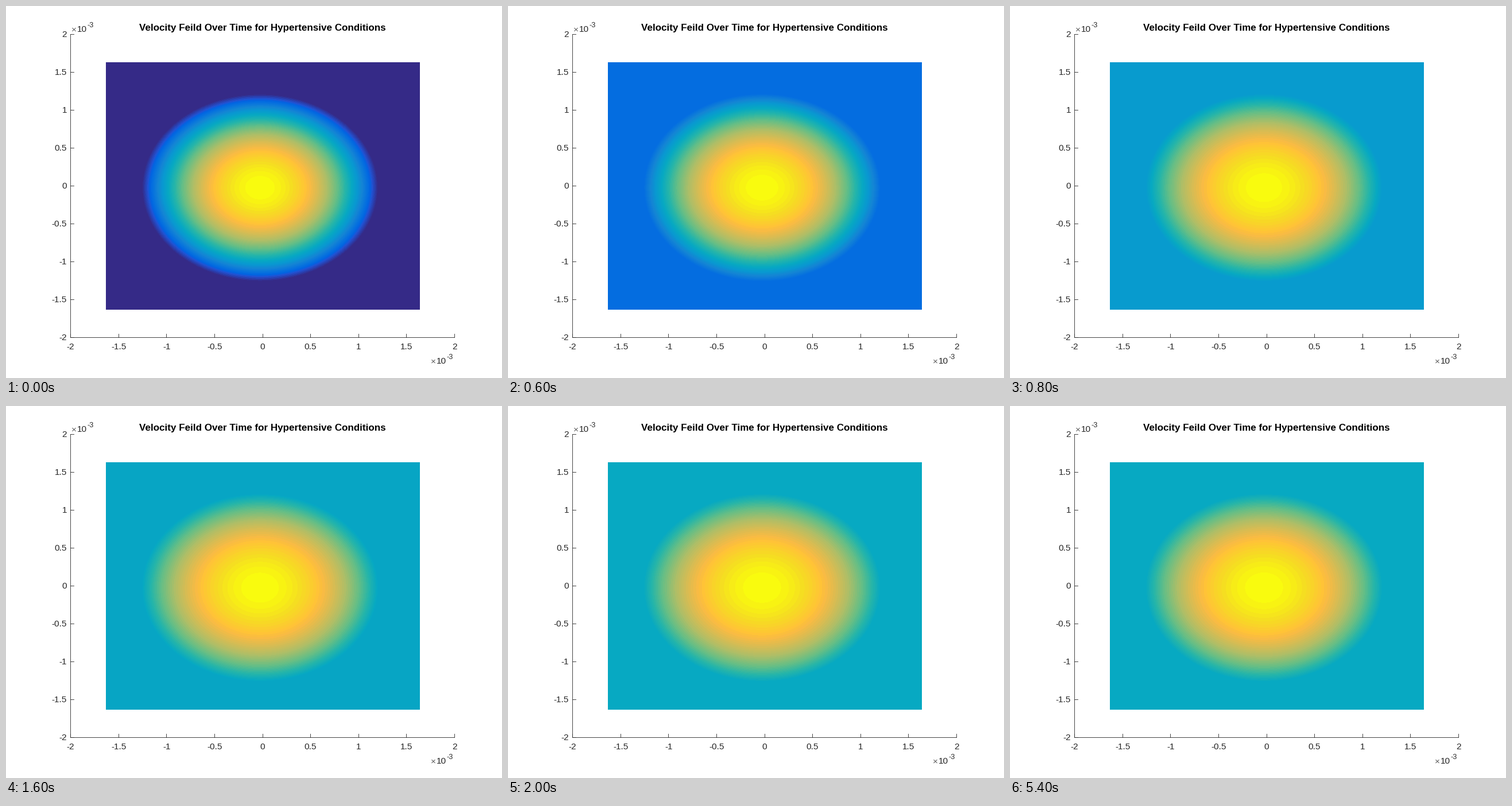
A matplotlib script for the animation above (5.6 s loop, 864x648 px).

```python
import numpy as np
import matplotlib.pyplot as plt
from matplotlib.animation import FuncAnimation
from matplotlib.colors import LinearSegmentedColormap

W, H, DPI = 864, 648, 72
plt.rcParams["font.family"] = "Liberation Sans"

# Colours at a few levels, blended into 64 flat steps
LEVELS = 64
KEYS = {0: "#352a87", 6: "#2053d4", 8: "#0363e1", 10: "#046de0", 16: "#1485d4",
        20: "#0998d1", 25: "#07a9c2", 30: "#25b5a9", 36: "#65be86", 43: "#aebe67",
        52: "#f8bb44", 54: "#ffc337", 59: "#f5de21", 63: "#f9fb0e"}
cmap = LinearSegmentedColormap.from_list(
    "flow", [(k / (LEVELS - 1), c) for k, c in KEYS.items()], N=LEVELS)

# Plot geometry in pixels, y pointing down
LEFT, RIGHT, TOP, BOTTOM = 112.5, 781.5, 49.5, 577.5
X0, X1, Y0, Y1 = 174, 721, 98, 529
CENTER, RADII = (442.5, 316.4), (206, 163.4)

STEP, LOOP = 200, 5600
# Start time in ms: colour level of the resting fluid
STAGES = {0: 0, 600: 10, 800: 21, 1000: 24, 2000: 25}

INK = "#262626"
SIZE = 15.43

px, py = np.meshgrid(np.arange(X0, X1) + .5, np.arange(Y0, Y1) + .5)
r2 = ((px - CENTER[0]) / RADII[0]) ** 2 + ((py - CENTER[1]) / RADII[1]) ** 2
profile = np.clip(1 - r2, 0, 1)


def field(now):
    rest = [level for start, level in STAGES.items() if start <= now][-1]
    base = (rest + .5) / LEVELS if rest else 0
    return base + (1 - base) * profile


def line(xs, ys):
    ax.plot(np.floor(xs) + .5, np.floor(ys) + .5, color=INK, lw=.85,
            snap=False, solid_capstyle="projecting")


def label(x, y, s, ha="left", size=SIZE, color=INK, **kw):
    ax.text(x, y, s, ha=ha, va="baseline", fontsize=size, color=color, **kw)


def multiplier(x, y):
    label(x, y, "×", color="#606060")
    label(x + 10.2, y, "10")
    label(x + 28, y - 8, "-3", size=12.6)


fig = plt.figure(figsize=(W / DPI, H / DPI), dpi=DPI, facecolor="white")
ax = fig.add_axes([0, 0, 1, 1])
ax.axis("off")
image = ax.imshow(field(0), cmap=cmap, vmin=0, vmax=1, extent=(X0, X1, Y1, Y0),
                  interpolation="nearest", aspect="auto")
ax.set_xlim(0, W)
ax.set_ylim(H, 0)
ax.set_autoscale_on(False)

line([LEFT, LEFT], [TOP, BOTTOM])
line([LEFT, RIGHT], [BOTTOM, BOTTOM])
for value in np.arange(-2, 2.5, .5):
    part = (value + 2) / 4
    x = LEFT + part * (RIGHT - LEFT)
    y = BOTTOM - part * (BOTTOM - TOP)
    line([x, x], [BOTTOM, BOTTOM - 6])
    line([LEFT, LEFT + 6], [y, y])
    label(x, 598, f"{value:g}", ha="center")
    label(106, y + 5, f"{value:g}", ha="right")

multiplier(113.7, 45.4)
multiplier(739.5, 623.4)
label(447, 43, "Velocity Feild Over Time for Hypertensive Conditions",
      ha="center", size=16.95, weight="bold", color="black")


def update(i):
    image.set_data(field(i * STEP))
    return [image]


anim = FuncAnimation(fig, update, frames=LOOP // STEP, interval=STEP,
                     repeat=True, repeat_delay=0)
plt.show()
```
